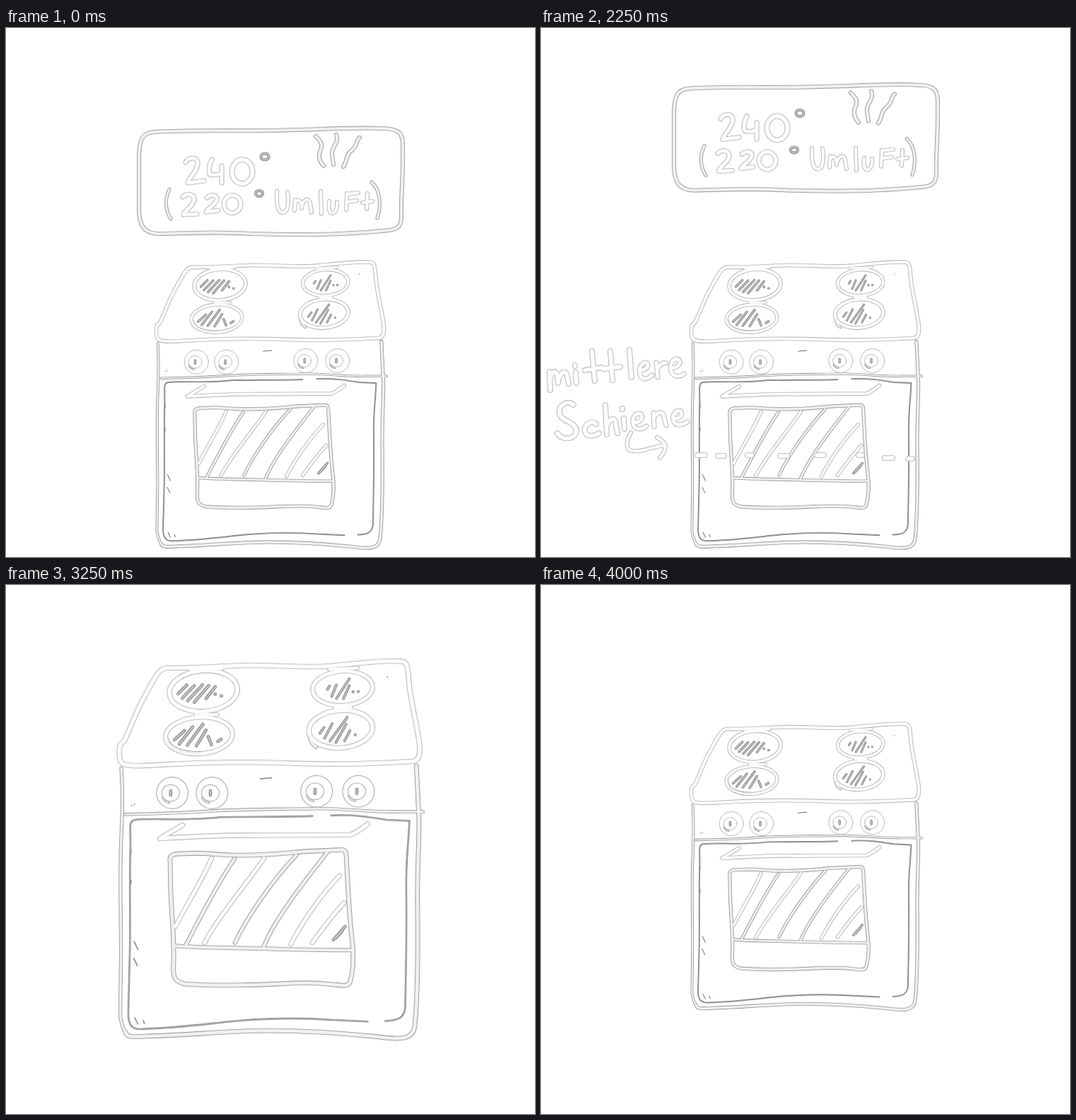
Animation of 748x748 px, one loop 4250 ms. Source, as an HTML page with a canvas:

```html
<!DOCTYPE html>
<html lang="de">
<head>
<meta charset="utf-8">
<title>Ofen vorheizen</title>
<style>
html, body { margin: 0; width: 100%; height: 100%; overflow: hidden; background: #fff; }
canvas { display: block; }
</style>
</head>
<body>
<canvas id="stage" width="748" height="748" role="img"
  aria-label="240° (220° Umluft), mittlere Schiene"></canvas>
<script>
const ctx = document.getElementById('stage').getContext('2d');

// Edge, body and highlight of a pencil tube
const LIGHT = ['#b6b6b6', '#f2f2f2', '#fff'];
const MID = ['#9c9c9c', '#e2e2e2', '#f2f2f2'];
const DARK = ['#848484', '#b0b0b0', '#c2c2c2'];
const THIN = ['#b4b4b4', '#fff', '#fff'];

const tube = (tone, width, d) => ({ tone, width, path: new Path2D(d) });

function ring(tone, width, x, y, rx, ry = rx, tilt = 0) {
  const path = new Path2D();
  path.ellipse(x, y, rx, ry, tilt, 0, 7);
  return { tone, width, path };
}

const knob = (x, y) => [
  ring(THIN, 1.6, x, y, 29.5),
  ring(THIN, 1.6, x - 3, y, 16.5, 15.5),
  tube(MID, 4, `M${x - 18} ${y + 9}q4 8 12 9`),
  tube(DARK, 6, `M${x - 3} ${y - 4}v8`)
];

const stove = [
  // hob
  tube(LIGHT, 10, `M93 183C92 192 91 206 97 212C104 220 140 217 160 216C200 214 250 210 330 211
    C400 211 440 215 500 214C560 214 600 211 640 209C650 208 653 195 652 180
    C649 150 638 110 633 70C630 45 632 24 620 23C590 20 540 26 490 31C440 36 400 30 330 30
    C290 31 240 36 180 35C165 36 155 60 134 98C118 130 111 152 101 172Q94 175 93 183`),
  ring(LIGHT, 10, 249, 78, 63.5, 38, -.08),
  ring(LIGHT, 9, 241, 161, 62.5, 34, -.06),
  ring(LIGHT, 9, 508.5, 73, 56, 32, -.06),
  ring(LIGHT, 10, 505, 149, 59.5, 35, -.08),
  // where the rings run into each other and the rim
  tube(LIGHT, 8, 'M235 122H275M494 109H524M224 38L284 36M484 38L536 35'),
  tube(MID, 8, 'M181 168Q184 181 200 188Q218 195 242 194M448 163Q449 176 459 182'),
  tube(DARK, 6, `M218 67L202 83M232 68L210 91M247 67L220 96M259 68L232 99M271 70L254 92
    M271 83v1M282 87h1M214 152L195 169M229 145L204 177M248 140L219 179M254 151L236 180
    M258 163L264 178M282 168L276 172`),
  tube(DARK, 5, `M484 69L480 75M497 67L488 88M521 55L497 92M521 68L510 92M528 79v1M537 79h1
    M474 146L466 157M489 139L475 166M517 127L485 171M515 140L496 174M522 152L512 171M532 159v1`),
  // body
  tube(MID, 7, 'M96 222C99 270 98 300 96 350C92 430 97 540 95 600L94 685Q98 705 104 715'),
  tube(MID, 9, `M104 714C106 724 116 723 150 721C230 719 290 711 370 711C450 711 520 717 570 722
    C620 729 640 727 643 702C649 640 649 560 648 480C647 400 653 340 650 300L646 218`),
  tube(MID, 6, 'M103 308C160 307 200 306 260 302C340 297 400 299 460 297C530 298 560 304 610 303L659 303'),
  tube(MID, 4, 'M648 296L658 303L650 307'),
  // door
  tube(DARK, 3.4, `M452 311C410 313 350 312 280 313C220 321 150 314 122 318C108 320 114 335 113 370
    C111 430 113 500 112 560L109 680C109 700 116 710 135 708C210 706 270 696 320 692
    C400 686 450 688 490 691L555 694M487 310C530 308 560 313 590 318L633 320
    C631 370 626 390 627 450C628 530 627 590 625 670C622 686 615 692 588 693`),
  tube(LIGHT, 10, 'M210 328L168 353C230 349 290 346 350 347C420 346 470 346 522 346Q530 345 555 326'),
  // window
  tube(MID, 9, `M187 395C185 382 195 381 215 381C255 378 270 384 310 384C370 385 400 380 440 377
    L505 374C517 373 515 383 516 400C519 450 520 490 526 540C530 570 528 600 523 618
    C520 630 510 627 490 625C430 618 390 626 320 626C270 627 240 626 215 624
    C198 620 193 615 193 595C196 550 190 500 188 450Z`),
  tube(MID, 8, 'M196 553C250 557 290 556 350 558C420 560 470 561 528 561'),
  tube(LIGHT, 9, `M264 390C245 435 218 475 197 517M362 390C335 430 272 505 251 548
    M503 422C470 455 432 510 412 550M511 473C490 495 468 525 452 547`),
  tube(MID, 8, `M307 391C274 438 238 510 216 552M422 384C378 430 330 500 308 547
    M481 377C440 430 383 500 361 555`),
  tube(DARK, 6, 'M513 517L491 542M508 525L496 538'),
  // panel and stray marks
  ...knob(191, 268), ...knob(265, 268), ...knob(460, 265), ...knob(538, 265),
  tube(DARK, 2, `M355 242Q364 240 376 240M592 51v1M115 291v1M120 289v1M120 545L127 560
    M119 576L126 590M121 687L127 699M137 692L139 698M114 372v10M114 430v8`)
];

const card = [
  tube(MID, 6, `M188 180C189 160 191 148 210 147C260 144 310 146 370 145C440 144 490 140 530 142
    C555 142 561 148 561 165C562 210 558 240 559 268C559 284 550 286 530 287
    C470 293 410 293 350 291C290 287 250 291 215 291C194 290 188 278 188 255Z`),
  tube(MID, 6, `M438 153C443 158 449 164 445 172C441 180 443 188 449 195
    M467 151C472 162 459 169 461 180L463 193M500 155C495 158 497 167 489 173C480 179 483 188 477 196`),
  tube(LIGHT, 7, `M254 190C258 181 273 182 271 193C269 205 258 212 257 219L280 216
    M291 186Q285 198 288 207Q296 209 304 206M305 195L305 219`),
  ring(LIGHT, 8, 334, 203, 14.5, 17),
  ring(DARK, 4, 366, 182, 5.5, 4.5),
  tube(MID, 5, 'M231 228C223 245 227 260 233 270M517 218C531 230 530 255 525 269'),
  tube(LIGHT, 7, `M250 239C255 233 267 234 266 243C265 252 252 258 251 264L270 263
    M284 240C290 234 300 236 298 243C296 250 285 255 283 260L300 258`),
  ring(LIGHT, 7, 320, 249, 12, 12.5),
  ring(DARK, 4, 358, 234, 5, 4),
  tube(LIGHT, 6, `M383 231C382 250 385 262 392 261C400 260 400 242 398 232
    M409 243L408 258M409 247C414 240 418 244 418 255C419 244 427 238 430 247L432 261
    M445 231L446 263M457 245C455 260 459 264 464 261Q469 257 468 246
    M482 234L481 257M482 235L498 233M482 246L496 244M511 234L510 256M504 247L518 245`)
];

const note = [
  // mittlere
  tube(LIGHT, 8, `M12 486L13 512M13 495C18 481 24 484 24 502C26 486 35 482 37 492L39 503
    M49 487L50 502M48 477v1M72 457L76 499M62 484L86 480M98 457L101 498M88 482L112 479
    M125 455L128 494`),
  tube(LIGHT, 7, `M140 484C150 484 155 475 148 473C138 473 136 494 146 496Q152 496 157 491
    M163 473L165 494M165 482Q169 472 177 474
    M184 480C195 482 201 470 192 468C181 468 180 490 191 492Q198 493 202 489`),
  // Schiene
  tube(LIGHT, 8, `M46 533C38 525 24 533 26 545C28 556 50 557 50 570C49 582 30 584 23 573
    M78 560C70 553 61 562 62 570C64 580 76 577 82 573
    M91 533L93 575M93 562C98 550 106 550 106 562L108 573M117 552L118 567M115 538v1`),
  tube(LIGHT, 7, `M131 558C143 558 147 546 138 545C127 546 127 566 138 567Q144 567 149 563
    M159 544L160 564M160 551C164 542 172 541 174 550L177 562
    M187 552C198 554 203 543 195 541C185 541 183 560 194 561Q201 561 207 557`),
  tube(LIGHT, 6, `M127 572C121 583 119 594 126 597C140 602 155 592 176 590
    M164 579Q172 583 176 590Q176 599 168 608`),
  // rail level
  tube(LIGHT, 8, `M221 604h11M250 605h9M292 604h6M338 605h10M390 604h10M449 604h5
    M486 608h11M519 609h6`)
];

// Every edge goes down before any body, so crossing tubes merge
function draw(parts, scale, x, y, angle = 0, px = 0, py = 0) {
  ctx.setTransform(scale, 0, 0, scale, x, y);
  ctx.translate(px, py);
  ctx.rotate(angle * Math.PI / 180);
  ctx.translate(-px, -py);
  for (let pass = 0; pass < 3; pass++) {
    for (const { tone, width, path } of parts) {
      const w = [width, width - 1.7 / scale, width * .6 - 1 / scale][pass];
      if (w <= 0) continue;
      ctx.strokeStyle = tone[pass];
      ctx.lineWidth = w;
      ctx.stroke(path);
    }
  }
}

const BEAT = 250, LOOP = 4250;
const tilts = [0, 14, 0, -14, 0];
const small = [.575, 159.4, 183.4], medium = [.7587, 90.2, 90.7], large = [1, 0, 0];
const zooms = [small, medium, large, medium, small];

function render(t) {
  ctx.setTransform(1, 0, 0, 1, 0, 0);
  ctx.fillStyle = '#fff';
  ctx.fillRect(0, 0, 748, 748);
  ctx.lineCap = ctx.lineJoin = 'round';
  if (t >= 3000) {
    draw(stove, ...zooms[Math.floor((t - 3000) / BEAT)]);
    return;
  }
  draw(stove, .575, 159.4, 318.1);
  if (t >= 500) draw(note, 1, 0, 0);
  if (t < 1750) draw(card, 1, 0, 0);
  else draw(card, 1, 0, -61.5, tilts[Math.floor((t - 1750) / BEAT)], 374.5, 218);
}

const start = performance.now();
function tick() {
  render((performance.now() - start) % LOOP);
  requestAnimationFrame(tick);
}
tick();
</script>
</body>
</html>
```
